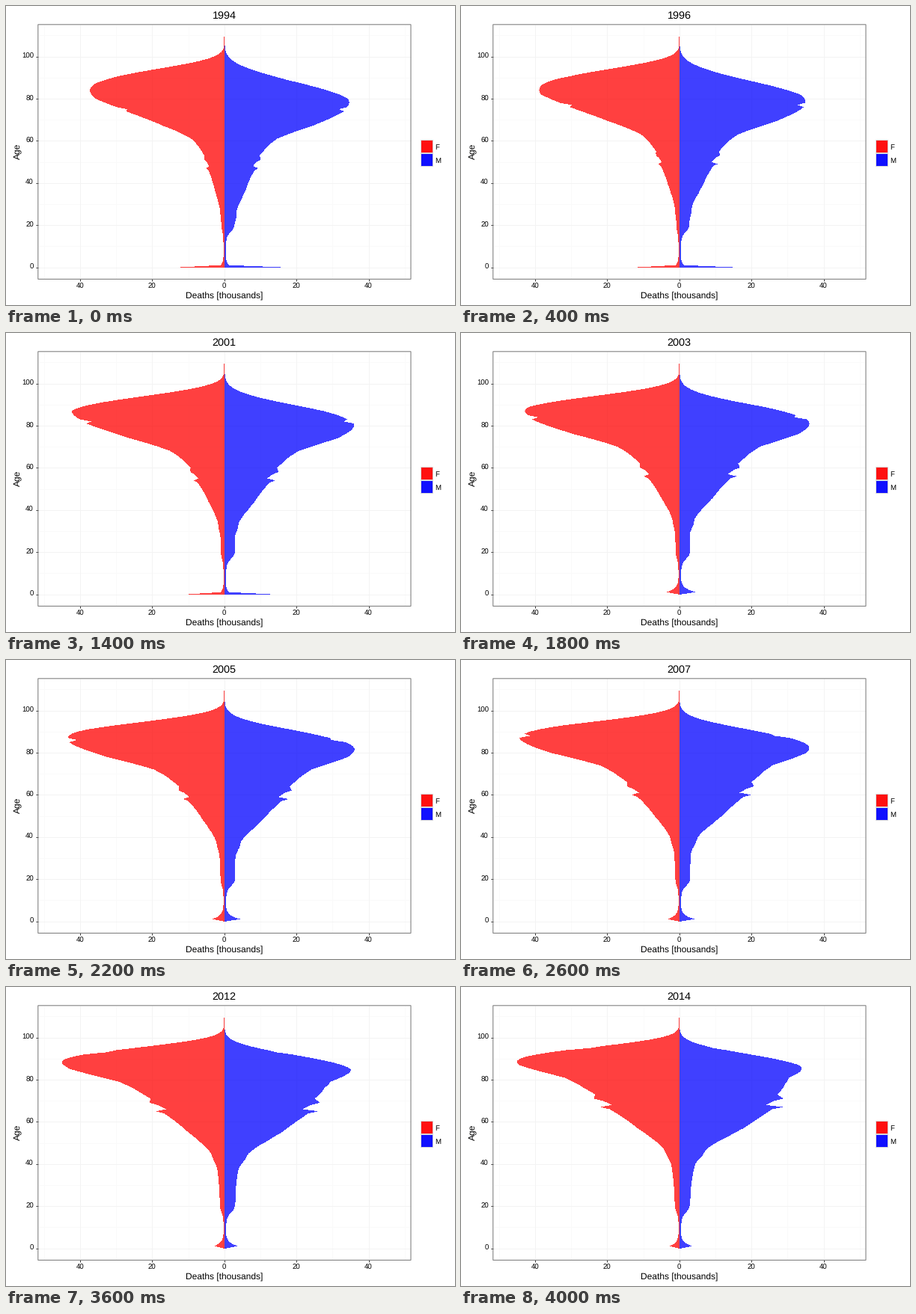
A matplotlib script for the animation above (4200 ms loop, 600 px wide and 400 px high).

```python
import numpy as np
import matplotlib.pyplot as plt
from matplotlib.animation import FuncAnimation
from matplotlib.patches import Polygon, Rectangle

plt.rcParams["font.family"] = "Liberation Sans"
plt.rcParams["text.hinting"] = "none"

W, H = 600, 400
LEFT, RIGHT, TOP, BOTTOM = 42.8, 541, 24.8, 365.4
X0, Y0, X_UNIT, Y_UNIT = 291.75, 349.5, 4.82, 2.819
MIDDLE = round(X0)
FIRST_YEAR, LAST_YEAR, RECODED = 1994, 2014, 2003
AGES = np.arange(110)
ROWS = np.arange(41, 350)

# Births in millions at the turning points between booms and slumps.
BIRTHS = {1905: 2.6, 1914: 2.95, 1918: 2.92, 1919: 2.76, 1920: 2.95, 1923: 2.9,
          1927: 2.8, 1933: 2.34, 1936: 2.38, 1941: 2.62, 1943: 3.05, 1944: 2.93,
          1946: 2.95, 1947: 3.75, 1948: 3.55, 1957: 4.3, 1961: 4.25, 1967: 3.5,
          1970: 3.6, 1974: 3.15, 1982: 3.68, 1990: 4.1}

# First and last year's value of each mortality parameter.
MORTALITY = {
    "F": dict(mode=(86, 88), peak=(13.5, 15.9), rise=(.085, .088),
              fall=(.117, .13), accidents=(.12, .2), infants=.78),
    "M": dict(mode=(78, 83), peak=(11.7, 13.1), rise=(.083, .079),
              fall=(.083, .108), accidents=(.66, .48), infants=1),
}


def infant_deaths(year):
    """Extra deaths of small children; age 0 is coded as 1 from 2003 on."""
    if year < RECODED:
        newborn, toddler = 15.4 - .4 * (year - FIRST_YEAR), 1.1
    else:
        newborn, toddler = .4, 4.4 - .1 * (year - RECODED)
    return np.where(AGES == 0, newborn, toddler * np.exp((1 - AGES) / 1.8))


def deaths(sex, year):
    """Thousands of deaths by age: cohort size times a Gompertz curve."""
    progress = (year - FIRST_YEAR) / (LAST_YEAR - FIRST_YEAR)
    params = MORTALITY[sex]
    mode, peak, rise, fall, accidents = (
        np.interp(progress, [0, 1], params[name])
        for name in ("mode", "peak", "rise", "fall", "accidents"))
    z = (AGES - mode) * np.where(AGES < mode, rise, fall)
    ageing = peak * np.exp(1 + z - np.exp(z))
    youth = accidents * np.exp((20 - AGES) / 30) / (1 + np.exp((17 - AGES) / 1.1))
    births = np.interp(year - AGES, list(BIRTHS), list(BIRTHS.values()))
    return births * (ageing + youth) + params["infants"] * infant_deaths(year)


def outline(sex, year):
    """Stepped silhouette, one whole-pixel step per pixel row."""
    side = -1 if sex == "F" else 1
    row_ages = (Y0 - ROWS - .5) / Y_UNIT
    width = np.maximum(np.interp(row_ages, AGES, deaths(sex, year)), .11)
    edge = np.repeat(np.round(X0 + side * width * X_UNIT), 2)
    y = np.column_stack([ROWS, ROWS + 1]).ravel()
    return np.vstack([[MIDDLE, ROWS[0]], np.column_stack([edge, y]),
                      [MIDDLE, ROWS[-1] + 1]])


def px(size):
    return size * .72


fig = plt.figure(figsize=(W / 100, H / 100), dpi=100, facecolor="white")
page = fig.add_axes([0, 0, 1, 1])
page.set(xlim=(0, W), ylim=(H, 0))
page.axis("off")


def line(xs, ys, color, order):
    page.plot(xs, ys, color=color, lw=px(1), zorder=order, solid_capstyle="butt")


def grid(values, ages, color):
    for value in values:
        x = X0 + value * X_UNIT
        line([x, x], [TOP, BOTTOM], color, 0)
    for age in ages:
        y = Y0 - age * Y_UNIT
        line([LEFT, RIGHT], [y, y], color, 0)


grid(range(-50, 51, 20), range(10, 111, 20), "#fafafa")
grid(range(-40, 41, 20), range(0, 101, 20), "#f3f3f3")
page.add_patch(Rectangle((LEFT, TOP), RIGHT - LEFT, BOTTOM - TOP, fill=False,
                         ec="#7f7f7f", lw=px(1.07), snap=False, zorder=3))

for value in range(-40, 41, 20):
    x = X0 + value * X_UNIT
    line([x, x], [BOTTOM, BOTTOM + 3], "#333333", 2)
    page.text(x, 375, abs(value), size=px(9.6), ha="center", va="center")
for age in range(0, 101, 20):
    y = Y0 - age * Y_UNIT
    line([LEFT - 3, LEFT], [y, y], "#333333", 2)
    page.text(37, y, age, size=px(9.6), ha="right", va="center")

page.text(X0, 392, "Deaths [thousands]", size=px(12), ha="center", va="baseline")
page.text(15, 194.5, "Age", size=px(12), rotation=90, ha="center", va="center")
title = page.text(X0, 16.5, "", size=px(14.4), ha="center", va="baseline")

for label, y, color in [("F", 179, "#ff1010"), ("M", 197, "#1010ff")]:
    page.add_patch(Rectangle((554, y), 17, 18, fc="#d9d9d9", lw=0))
    page.add_patch(Rectangle((555, y + 1), 15, 16, fc=color, lw=0))
    page.text(573, y + 12.6, label, size=px(9.6), va="baseline")

shapes = {}
for sex, color in [("F", "red"), ("M", "blue")]:
    shapes[sex] = Polygon(outline(sex, FIRST_YEAR), fc=color, alpha=.75, lw=0,
                          snap=False, zorder=1)
    page.add_patch(shapes[sex])


def draw(frame):
    year = FIRST_YEAR + frame
    title.set_text(str(year))
    for sex, shape in shapes.items():
        shape.set_xy(outline(sex, year))
    return [title, *shapes.values()]


anim = FuncAnimation(fig, draw, frames=LAST_YEAR - FIRST_YEAR + 1, interval=200,
                     repeat=True, repeat_delay=0)
plt.show()
```
